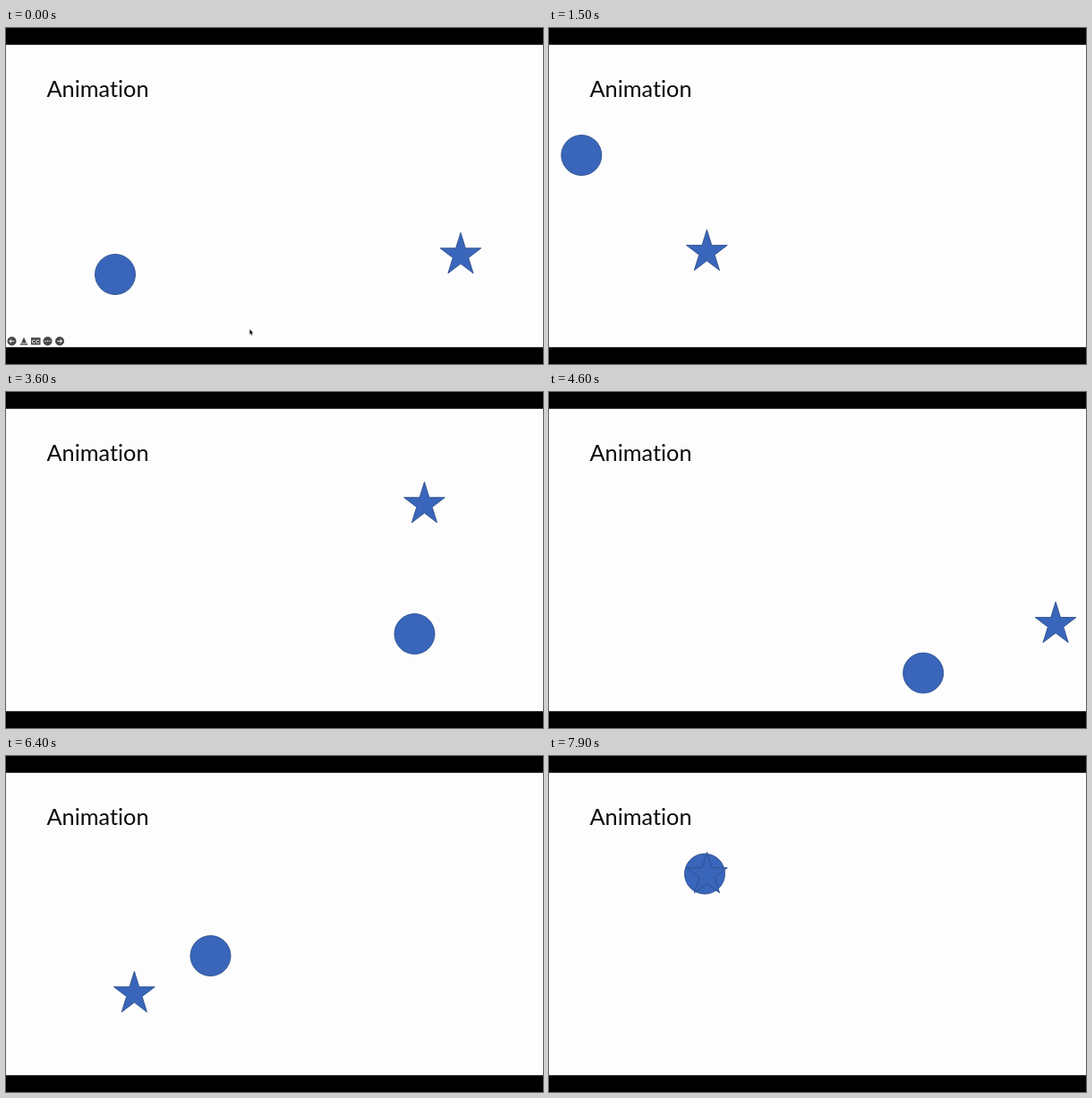
Recreate the animation shown at these times as an HTML page with a canvas. Size 600 by 375 pixels, loop 8000 ms.

```html
<!DOCTYPE html>
<html lang="en">
<head>
<meta charset="utf-8">
<title>Animation</title>
<style>
  html, body { margin: 0; width: 600px; height: 375px; overflow: hidden; background: #fdfdfd; }
  canvas { position: absolute; left: 0; top: 0; }
  h1 {
    position: absolute; left: 45.5px; top: 52.3px; margin: 0; color: #0c0c0c;
    font: 400 25.3px/30px Lato, "Open Sans", sans-serif;
    font-variant-ligatures: none; white-space: nowrap;
  }
</style>
</head>
<body>
<canvas id="stage" width="600" height="375"></canvas>
<h1>Animation</h1>
<script>
const ctx = document.getElementById('stage').getContext('2d');
const LOOP = 8000, STEP = 100, CONTROLS_END = 400;
const FILL = '#3966ba', LINE = '#2d4f8c', GREY = '#484848';

// Closed curves through a few key points: [seconds, x, y]
const circlePath = { period: 6, keys: [
  [0, 122, 275], [0.4, 228.5, 223], [0.65, 262, 195], [1.2, 56, 183], [1.5, 36.3, 142],
  [1.9, 174, 131.5], [2.3, 315.5, 131.3], [2.9, 508, 152], [3.3, 415, 222],
  [3.6, 456.5, 270], [4.05, 572, 292], [4.5, 447, 311], [5.5, 150.5, 309.5], [5.75, 85, 298]
] };
const starPath = { period: 5, keys: [
  [0, 508, 252], [0.5, 307, 282], [1.1, 65, 312], [1.45, 159.4, 256], [1.75, 256, 216],
  [2.3, 44.3, 190], [2.5, 26, 158], [2.9, 176.5, 131], [3.6, 467.5, 124],
  [4.05, 480, 205], [4.5, 565, 255]
] };

function pointAt({ period, keys }, time) {
  const n = keys.length, t = time % period;
  const key = i => {
    const [s, x, y] = keys[(i + n) % n];
    return [s + Math.floor(i / n) * period, x, y];
  };
  let i = n - 1;
  while (keys[i][0] > t) i--;
  const [a, b, c, d] = [-1, 0, 1, 2].map(k => key(i + k));
  const h = c[0] - b[0], u = (t - b[0]) / h;
  const slope = (p, q, r, k) => {
    const h1 = q[0] - p[0], h2 = r[0] - q[0];
    return ((q[k] - p[k]) / h1 * h2 + (r[k] - q[k]) / h2 * h1) / (h1 + h2);
  };
  return [1, 2].map(k => {
    const m0 = slope(a, b, c, k) * h, m1 = slope(b, c, d, k) * h;
    const e = c[k] - b[k];
    return b[k] + u * (m0 + u * (3 * e - 2 * m0 - m1 + u * (m0 + m1 - 2 * e)));
  });
}

function paint() {
  ctx.fillStyle = FILL;
  ctx.strokeStyle = LINE;
  ctx.lineWidth = 0.9;
  ctx.fill();
  ctx.stroke();
}

function disc(x, y, r) {
  ctx.beginPath();
  ctx.arc(x, y, r, 0, Math.PI * 2);
}

function star(x, y) {
  ctx.beginPath();
  for (let i = 0; i < 10; i++) {
    const a = i * Math.PI / 5, r = i % 2 ? 0.382 : 1;
    ctx.lineTo(x + 24 * r * Math.sin(a), y + 1.5 - 25.1 * r * Math.cos(a));
  }
  ctx.closePath();
}

function polygon(x, y, pts) {
  ctx.beginPath();
  pts.forEach(([px, py]) => ctx.lineTo(x + px, y + py));
  ctx.closePath();
}

function arrow(x, y, dir) {
  ctx.beginPath();
  ctx.moveTo(x - 2.6 * dir, y);
  ctx.lineTo(x + 2.6 * dir, y);
  ctx.moveTo(x + 0.4 * dir, y - 2.2);
  ctx.lineTo(x + 2.6 * dir, y);
  ctx.lineTo(x + 0.4 * dir, y + 2.2);
  ctx.strokeStyle = '#fff';
  ctx.lineWidth = 1;
  ctx.stroke();
}

function controls() {
  const y = 349.5;
  ctx.fillStyle = GREY;
  for (const x of [6.5, 46.5, 60]) { disc(x, y, 5); ctx.fill(); }
  arrow(6.5, y, -1);
  arrow(60, y, 1);

  polygon(20, y, [[0, -4.5], [3, 2], [-3, 2]]);
  ctx.fill();
  ctx.fillRect(15.8, y + 2.8, 8.4, 1.4);
  ctx.fillRect(28, y - 4, 10.5, 8);

  ctx.fillStyle = '#fff';
  ctx.font = 'bold 6px "Liberation Sans", sans-serif';
  ctx.textAlign = 'center';
  ctx.fillText('CC', 33.2, y + 2.2);
  for (const dx of [-2.4, 0, 2.4]) { disc(46.5 + dx, y, 0.7); ctx.fill(); }
}

function pointer(x, y) {
  polygon(x, y, [[0, 0], [0, 5.6], [1.3, 4.5], [2.2, 6.6], [3.1, 6.2], [2.2, 4.1], [3.8, 4]]);
  ctx.fillStyle = '#111';
  ctx.fill();
}

function draw(ms) {
  ctx.fillStyle = '#000';
  ctx.fillRect(0, 0, 600, 375);
  ctx.fillStyle = '#fdfdfd';
  ctx.fillRect(0, 18.75, 600, 337.5);

  const s = ms / 1000;
  disc(...pointAt(circlePath, s), 22.5);
  paint();
  star(...pointAt(starPath, s));
  paint();
  if (ms < CONTROLS_END) {
    controls();
    pointer(272.3, 336.3);
  }
}

const start = performance.now();
function tick() {
  const ms = (performance.now() - start) % LOOP;
  draw(Math.floor(ms / STEP) * STEP);
  requestAnimationFrame(tick);
}
tick();
</script>
</body>
</html>
```
